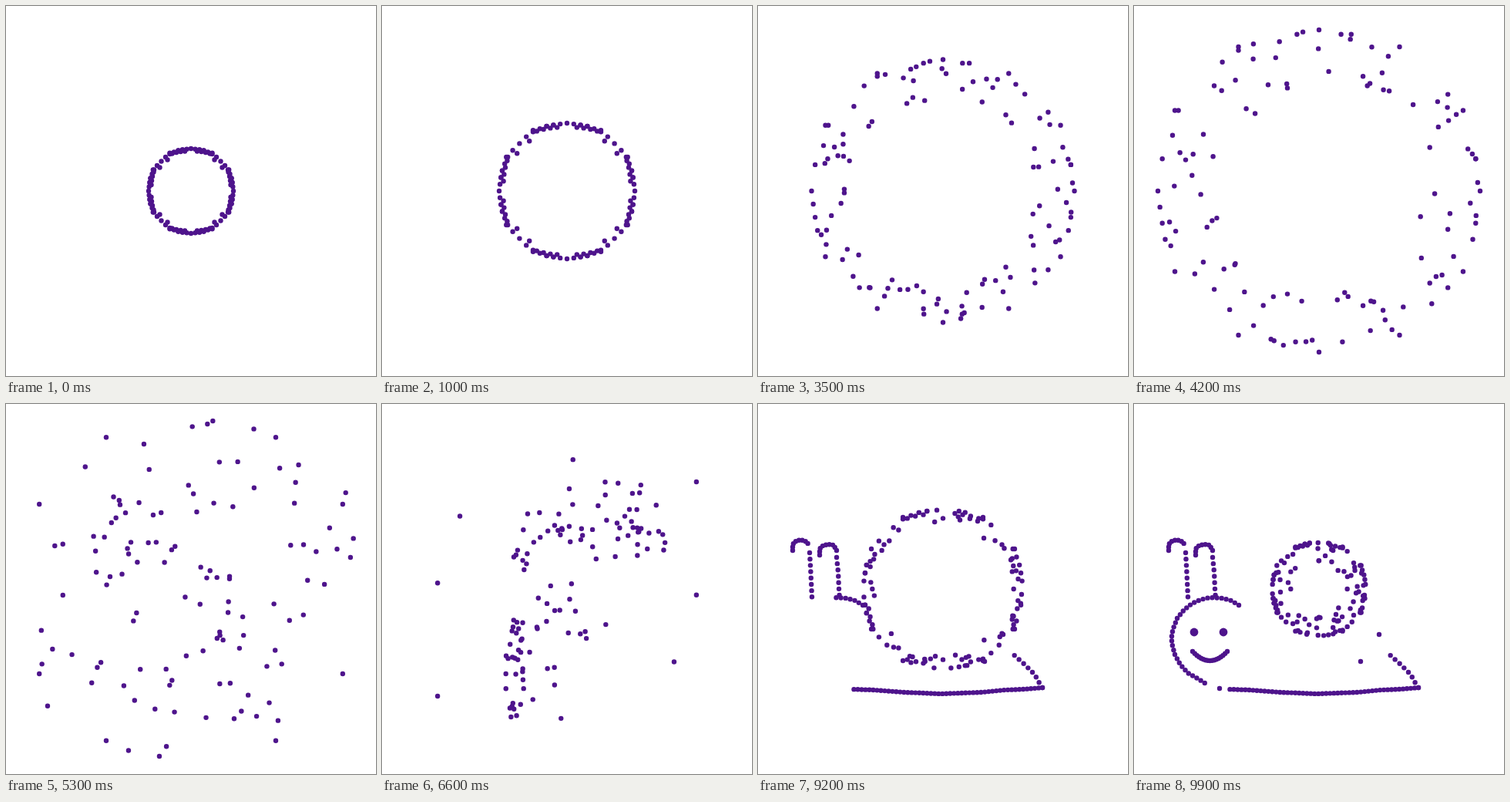
These frames come from a looping animation (480x480 px, 10000 ms). An HTML page with a canvas:

```html
<!DOCTYPE html>
<html lang="en">
<head>
<meta charset="utf-8">
<title>Dots to snail</title>
<style>
  html, body { margin: 0; width: 100%; height: 100%; overflow: hidden; background: #fff; }
  canvas { display: block; width: 480px; height: 480px; }
</style>
</head>
<body>
<canvas id="stage" width="480" height="480"></canvas>
<script>
const ctx = document.getElementById('stage').getContext('2d');
const LOOP = 10000, TICK = 100, MID = 240, EDGE = 219, DOT = 3.2;

let seed = 29;
function rnd() {
  seed = (seed * 1664525 + 1013904223) % 4294967296;
  return seed / 4294967296;
}
const clamp = (v, lo, hi) => Math.min(hi, Math.max(lo, v));
const mix = (a, b, k) => a + (b - a) * k;

// Ring of radius 55, built by mirroring one octant.
function mirror([x, y]) {
  const out = [];
  for (const [a, b] of [[x, y], [y, x]])
    for (const sx of [1, -1])
      for (const sy of [1, -1]) out.push([a * sx, b * sy]);
  return out;
}
const octant = [
  [27.5, 49.2], [5.5, 54.3], [11, 53.5], [16.5, 52.5], [22, 50.5], [33, 44],
  [8, 51.5], [13.5, 51], [19, 50], [24.5, 48.5], [30.5, 40.5],
  [11, 53.5], [27.5, 48], [16.5, 52.5]
];
const fixed = 8, axes = 12;
const ring = [
  ...mirror(octant[0]),
  [55, 0], [-55, 0], [0, -55], [0, 55],
  ...octant.slice(1).flatMap(mirror),
  [38.5, 38.5], [-38.5, 38.5], [38.5, -38.5], [-38.5, -38.5]
];
const count = ring.length;

function swap(list, a, b) { [list[a], list[b]] = [list[b], list[a]]; }
function shuffle(list, share) {
  const out = list.slice();
  for (let i = axes; i < count; i++)
    if (rnd() < share) swap(out, i, axes + Math.floor(rnd() * (count - axes)));
  return out;
}
const grow = (list, s) => list.map(([x, y]) => [x * s, y * s]);

// Soft clouds: centre x, y, half width, half height, number of dots.
const clouds = [
  [172, 345, 12, 66, 30], [222, 262, 28, 32, 10], [203, 360, 22, 28, 6],
  [265, 285, 34, 25, 6], [305, 152, 74, 56, 40], [222, 155, 40, 62, 16],
  [160, 197, 30, 12, 5], [326, 243, 14, 10, 5]
];
const cloudDots = clouds.flatMap(([x, y, w, h, n]) =>
  Array.from({ length: n }, () => [
    x - MID + (rnd() * 2 - 1) * w,
    y - MID + (rnd() * 2 - 1) * h
  ]));

const order2 = shuffle(ring, 0.3);
swap(order2, 10, 11);
const order3 = shuffle(order2, 0.7);
const order6 = shuffle(order3, 0.8);
const order7 = shuffle(order6, 0.3);
swap(order7, 8, 9);
swap(order7, 10, 11);

const ring4 = grow(order3, 4);
const spread = ring4.map(([x, y], i) => i < fixed
  ? [Math.abs(y) * Math.sign(x + y), -x]
  : [((i * 0.754878) % 1 - 0.5) * 2 * EDGE, ((i * 0.56984) % 1 - 0.5) * 2 * EDGE]);
const bunch = ring4.map((p, i) => {
  if (i < fixed) return p;
  const c = cloudDots[(i - fixed) % cloudDots.length];
  return [0, 1].map(n => clamp(1.5 * c[n] - 0.5 * spread[i][n], -EDGE, EDGE));
});

const poses = [
  ring, grow(ring, 2), grow(order2, 3), ring4,
  bunch, spread, grow(order6, 2), order7
];
// Start of each move and the number of ticks it takes.
const moves = [
  [500, 10], [2000, 10], [3500, 10], [5000, 9], [6400, 9], [7800, 9], [9200, 9]
];

// Dots at an even gap along a polyline.
function trace(pts, gap) {
  const out = [pts[0]];
  let left = gap;
  for (let i = 1; i < pts.length; i++) {
    const [ax, ay] = pts[i - 1], [bx, by] = pts[i];
    const len = Math.hypot(bx - ax, by - ay);
    let d = left;
    for (; d <= len; d += gap) out.push([mix(ax, bx, d / len), mix(ay, by, d / len)]);
    left = d - len;
  }
  return out;
}
const body = [
  ...trace([[369, 368], [345, 370], [320, 371], [290, 374], [237, 376],
    [190, 374], [150, 371], [120, 370]], 5),
  ...trace([[369, 368], [365, 362], [359, 351], [346, 338], [327, 321]], 8),
  ...trace([[45, 190], [45, 183], [47, 179], [55, 176], [64, 179], [66, 185]], 4.5),
  ...trace([[67, 193], [68, 210], [69, 230], [70, 251]], 8.2),
  ...trace([[80, 196], [80, 188], [84, 184], [91, 182], [98, 183], [102, 190]], 4.5),
  ...trace([[102, 199], [104, 218], [105, 240], [106, 254]], 8.2),
  [318, 299], [294, 334]
];
const smile = Array.from({ length: 17 }, (_, i) => {
  const u = i / 8 - 1;
  return [98.5 + 22.5 * u, 333 - 12 * u * u];
});
const head = [
  ...trace([[136, 261], [126, 255], [115, 252], [98, 251], [86, 254], [75, 259],
    [65, 267], [56, 278], [51, 291], [49, 299], [49, 310], [53, 325],
    [60, 338], [70, 349], [84, 357], [95, 364]], 6.1),
  [111, 369], [78, 296, 5.4], [116, 296, 5.4], ...smile
];

function dot(x, y, r = DOT) {
  ctx.beginPath();
  ctx.arc(x, y, r, 0, Math.PI * 2);
  ctx.fill();
}
function drawPart(list, share) {
  const n = Math.round(list.length * clamp(share, 0, 1));
  for (let i = 0; i < n; i++) dot(...list[i]);
}

function draw(time) {
  const tick = Math.floor((time % LOOP) / TICK);
  const since = start => tick - start / TICK + 1;
  let at = 0;
  while (at < moves.length - 1 && since(moves[at + 1][0]) > 0) at++;
  const [start, steps] = moves[at];
  const k = clamp(since(start) / steps, 0, 1);

  ctx.fillStyle = '#fff';
  ctx.fillRect(0, 0, 480, 480);
  ctx.fillStyle = '#4e148c';
  poses[at].forEach(([x, y], i) => {
    const [u, v] = poses[at + 1][i];
    dot(MID + mix(x, u, k), MID + mix(y, v, k));
  });
  drawPart(body, since(8100) / 6);
  drawPart(head, since(9200) / 8);
}

const begin = performance.now();
function loop() {
  draw(performance.now() - begin);
  requestAnimationFrame(loop);
}
loop();
</script>
</body>
</html>
```
